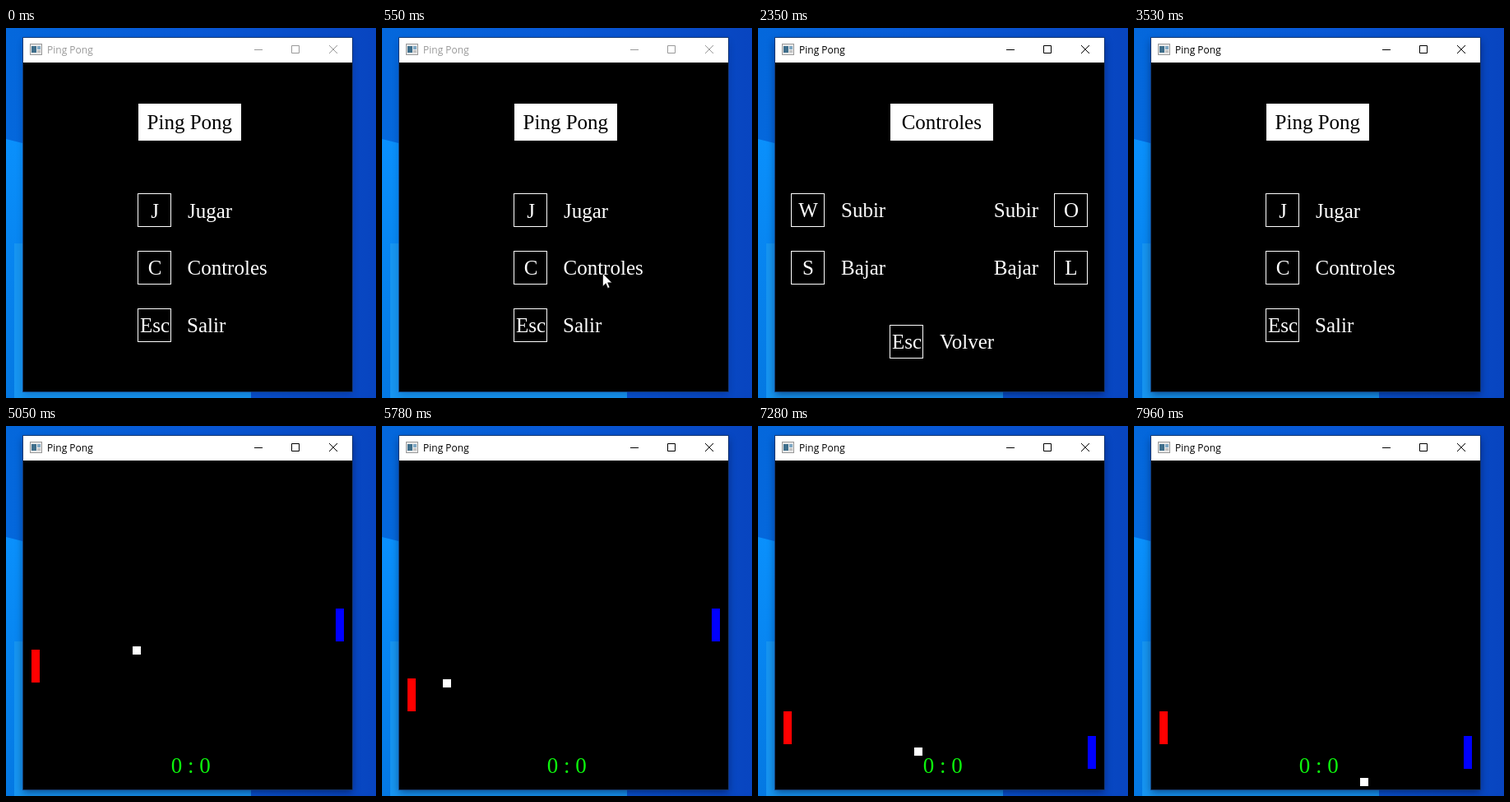
An HTML page for the animation above (7990 ms loop, 450 by 450 pixels).

```html
<!DOCTYPE html>
<html lang="es">
<head>
<meta charset="utf-8">
<title>Ping Pong</title>
<style>
html, body { margin: 0; width: 100%; height: 100%; overflow: hidden; background: #0848c4; }
#stage { position: relative; width: 450px; height: 450px; overflow: hidden; }
#stage > svg { position: absolute; left: 0; top: 0; display: block; }
.serif { font: 25px "Liberation Serif", "Times New Roman", serif; fill: #fff; }
.mid { text-anchor: middle; }
.end { text-anchor: end; }
.key { fill: none; stroke: #fff; }
.plate { fill: #fff; }
.ink { fill: #000; }
.score { font-size: 27px; fill: #0cf50c; }
.caption { font: 12px "Open Sans", "Noto Sans", sans-serif; }
.bar { color: #000; }
.bar text { fill: currentColor; }
.bar path { fill: none; stroke: currentColor; }
.mover { position: absolute; }

/* every track shares one 7990 ms clock */
.bar, .shade, .menu, .help, .game, .mover { animation: 7990ms linear infinite; }
.bar { animation-name: focus; animation-timing-function: step-end; }
.shade { animation-name: shade; animation-timing-function: step-end; }
.menu { animation-name: menu; animation-timing-function: step-end; }
.help { animation-name: help; animation-timing-function: step-end; }
.game { animation-name: game; animation-timing-function: step-end; }

@keyframes focus { 0% { color: #999; } 10.13%, 100% { color: #000; } }
@keyframes shade { 0% { opacity: .45; } 10.13%, 100% { opacity: 1; } }
@keyframes menu {
  0% { visibility: visible; }
  29.41% { visibility: hidden; }
  44.18% { visibility: visible; }
  56.57%, 100% { visibility: hidden; }
}
@keyframes help {
  0% { visibility: hidden; }
  29.41% { visibility: visible; }
  44.18%, 100% { visibility: hidden; }
}
@keyframes game { 0% { visibility: hidden; } 56.57%, 100% { visibility: visible; } }

#red, #blue { width: 10px; height: 40px; }
#red { left: 31px; background: #f00; animation-name: red; }
#blue { left: 401px; background: #00f; animation-name: blue; }
#ball { width: 10px; height: 10px; background: #fff; animation-name: ball; }
#mouse { width: 14px; height: 20px; animation-name: mouse; }

/* paddles advance 5px per tick */
@keyframes red {
  0%, 60.576% { top: 222px; animation-timing-function: steps(10); }
  62.954%, 70.588% { top: 272px; animation-timing-function: steps(9); }
  72.816%, 78.223% { top: 317px; animation-timing-function: steps(6); }
  79.662%, 100% { top: 347px; }
}
@keyframes blue {
  0%, 81.915% { top: 222px; animation-timing-function: steps(31); }
  89.361%, 100% { top: 377px; }
}
@keyframes ball {
  0%, 56.57% { left: 216px; top: 237px; }
  63.204% { left: 154px; top: 268px; }
  72.34% { left: 74px; top: 308px; }
  76.22% { left: 41px; top: 325px; }
  84.105% { left: 117px; top: 359px; }
  86.733% { left: 144px; top: 371px; }
  96.746% { left: 248px; top: 416px; }
  99.625%, 100% { left: 275px; top: 428px; }
}
@keyframes mouse {
  0%, 1.627% { left: 290px; top: 451px; animation-timing-function: ease-out; }
  10.638%, 12.265% { left: 262px; top: 252px; animation-timing-function: ease-in-out; }
  16.646%, 17.897% { left: 248px; top: 156px; animation-timing-function: ease-in; }
  19.02% { left: 264px; top: 131px; }
  21.902% { left: 442px; top: 188px; }
  22.653%, 100% { left: 452px; top: 194px; }
}
</style>
</head>
<body>
<div id="stage">
  <svg width="450" height="450" viewBox="0 0 450 450">
    <defs>
      <linearGradient id="sky">
        <stop offset="0" stop-color="#0468dc"/>
        <stop offset=".5" stop-color="#0858d6"/>
        <stop offset="1" stop-color="#0845c0"/>
      </linearGradient>
      <linearGradient id="beam" x1="0" y1="0" x2="0" y2="1">
        <stop offset="0" stop-color="#0a90fc"/>
        <stop offset="1" stop-color="#0478e2"/>
      </linearGradient>
      <filter id="soft" x="-10%" y="-10%" width="120%" height="120%">
        <feGaussianBlur stdDeviation="5"/>
      </filter>
    </defs>
    <rect width="450" height="450" fill="url(#sky)"/>
    <path d="M0 135L60 150V450H0Z" fill="url(#beam)"/>
    <rect x="10" y="262" width="288" height="288" fill="#1694f0"/>
    <rect class="shade" x="21" y="16" width="400" height="430" fill="#002" fill-opacity=".45" filter="url(#soft)"/>
    <rect x="20.5" y="11.5" width="401" height="431" fill="#000" stroke="#1c3f78" stroke-opacity=".7"/>
    <rect x="21" y="12" width="400" height="30" fill="#fff"/>

    <rect x="29.5" y="19.5" width="14" height="13" fill="#e9e9e9" stroke="#999"/>
    <rect x="31" y="22" width="6" height="8" fill="#3f6f8c"/>
    <rect x="38" y="22" width="4" height="4" fill="#7fa8c4"/>
    <rect x="38" y="27" width="4" height="3" fill="#c4c4c4"/>
    <g class="bar">
      <text class="caption" x="50" y="31">Ping Pong</text>
      <path d="M302 26.5H312M347.5 21.5H356.5V30.5H347.5ZM393 21L403 31M403 21L393 31"/>
    </g>

    <g class="menu serif">
      <rect class="plate" x="161" y="92" width="125" height="45"/>
      <text class="mid ink" x="223.3" y="123">Ping Pong</text>
      <rect class="key" x="160.5" y="201.5" width="40" height="40"/>
      <rect class="key" x="160.5" y="271.5" width="40" height="40"/>
      <rect class="key" x="160.5" y="341.5" width="40" height="40"/>
      <text class="mid" x="181" y="231">J</text>
      <text class="mid" x="181" y="300">C</text>
      <text class="mid" x="181" y="370">Esc</text>
      <text x="221" y="231">Jugar</text>
      <text x="220.5" y="300">Controles</text>
      <text x="220" y="370">Salir</text>
    </g>

    <g class="help serif">
      <rect class="plate" x="161" y="92" width="125" height="45"/>
      <text class="mid ink" x="223.3" y="123">Controles</text>
      <rect class="key" x="40.5" y="201.5" width="40" height="40"/>
      <rect class="key" x="40.5" y="271.5" width="40" height="40"/>
      <rect class="key" x="360.5" y="201.5" width="40" height="40"/>
      <rect class="key" x="360.5" y="271.5" width="40" height="40"/>
      <rect class="key" x="160.5" y="361.5" width="40" height="40"/>
      <text class="mid" x="61" y="230">W</text>
      <text class="mid" x="61" y="300">S</text>
      <text class="mid" x="381" y="230">O</text>
      <text class="mid" x="381" y="300">L</text>
      <text class="mid" x="181" y="390">Esc</text>
      <text x="101" y="230">Subir</text>
      <text x="101" y="300">Bajar</text>
      <text class="end" x="341" y="230">Subir</text>
      <text class="end" x="341" y="300">Bajar</text>
      <text x="221" y="390">Volver</text>
    </g>

    <g class="game serif">
      <text class="score" x="200.7" y="422">0 : 0</text>
    </g>
  </svg>

  <div class="game">
    <div id="red" class="mover"></div>
    <div id="blue" class="mover"></div>
    <div id="ball" class="mover"></div>
  </div>
  <svg id="mouse" class="mover" viewBox="0 0 14 20">
    <path d="M.5 .5V16.2L4.2 12.7L6.6 18.4L9 17.4L6.6 11.8H11.7Z" fill="#fff" stroke="#000" stroke-width=".6"/>
  </svg>
</div>
</body>
</html>
```
